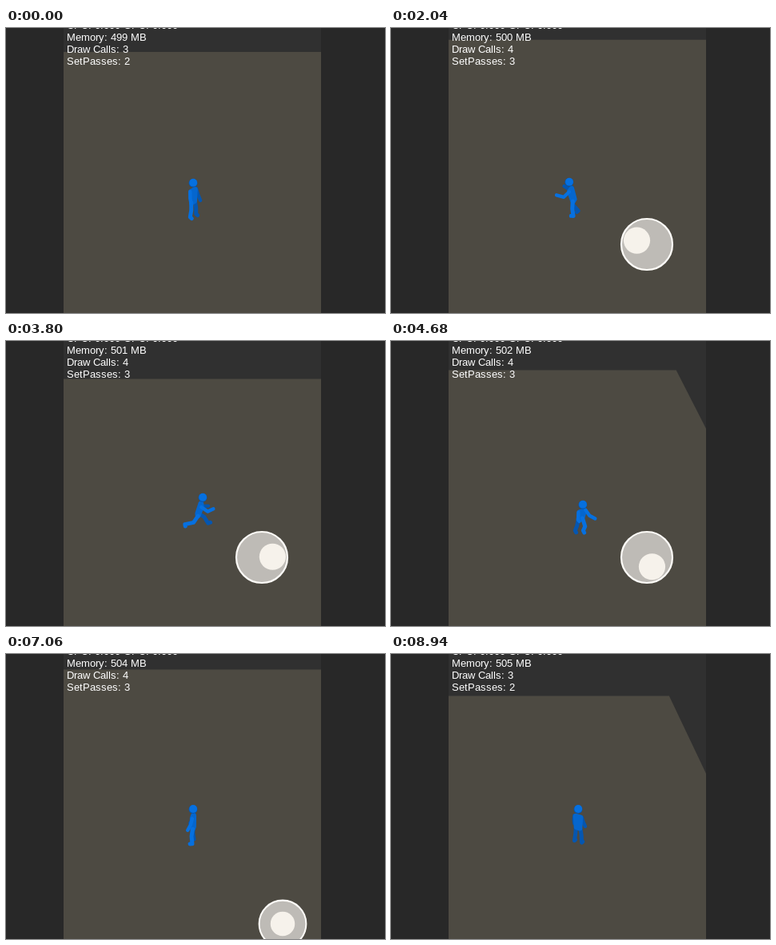
An HTML page with a canvas for the animation above (8.96 s loop, 474 by 357 pixels).

```html
<!DOCTYPE html>
<html lang="en">
<head>
<meta charset="utf-8">
<title>Joystick runner</title>
<style>
html, body { margin: 0; width: 100%; height: 100%; overflow: hidden; background: #282828; }
canvas { display: block; }
</style>
</head>
<body>
<canvas id="stage" width="474" height="357"></canvas>
<script>
const ctx = document.getElementById('stage').getContext('2d');
const LOOP = 8960, TAU = Math.PI * 2;
const { sin, cos } = Math;

// Two presses of the stick: it pops up, is pushed from `move` on, and let go at `up`.
const touches = [
  { x: 320, y: 271, down: 720, move: 1100, up: 5638 },
  { x: 346, y: 338, down: 6960, move: 7150, up: 8488 }
];
// Direction of travel in degrees, clockwise from screen right: [time, angle].
const turns = [[1100, 48], [2030, 200], [2980, 297], [4680, 421], [5650, 550], [7060, 550], [7120, 654]];

const ramp = (t, a, b) => Math.min(1, Math.max(0, (t - a) / (b - a)));
const ease = u => u * u * (3 - 2 * u);
const touchAt = t => touches[t < 6400 ? 0 : 1];

function headingAt(t) {
  let deg = turns[0][1];
  for (let i = 1; i < turns.length; i++)
    deg += (turns[i][1] - turns[i - 1][1]) * ramp(t, turns[i - 1][0], turns[i][0]);
  return deg * Math.PI / 180;
}

function runAt(t) {
  const { move, up } = touchAt(t);
  return ease(ramp(t, move - 100, move + 200)) * (1 - ease(ramp(t, up, up + 250)));
}

// The camera follows the runner, so the far floor corner moves against the travel.
function floorCorner(t) {
  let x = 416, y = 30;
  for (let s = 5; s < t; s += 10) {
    const { move, up } = touchAt(s);
    if (s < move || s > up) continue;
    const a = headingAt(s);
    x -= .85 * cos(a);
    y -= .27 * sin(a);
  }
  return [x, y];
}

function disc(x, y, r, fill) {
  ctx.beginPath();
  ctx.arc(x, y, r, 0, TAU);
  ctx.fillStyle = fill;
  ctx.fill();
}

function path(points, width, color) {
  ctx.beginPath();
  points.forEach(p => ctx.lineTo(...p));
  ctx.lineWidth = width;
  ctx.strokeStyle = color;
  ctx.stroke();
}

function drawFloor(t) {
  const [x, y] = floorCorner(t);
  ctx.fillStyle = '#282828';
  ctx.fillRect(0, 0, 474, 357);
  ctx.fillStyle = '#303030';
  ctx.fillRect(72, 0, 322, 357);
  ctx.save();
  ctx.beginPath();
  ctx.rect(72, 0, 322, 357);
  ctx.clip();
  ctx.beginPath();
  ctx.moveTo(72, y);
  ctx.lineTo(x, y);
  ctx.lineTo(x + (357 - y) * (x - 235) * .0042, 357);
  ctx.lineTo(72, 357);
  ctx.fillStyle = '#4d4a42';
  ctx.fill();
  ctx.restore();
}

// A jointed body in (right, up, forward) space, seen from above at a slant.
function drawRunner(t) {
  const run = runAt(t), a = headingAt(t);
  const phase = TAU * 2.1 * (t - 2980) / 1000;
  const rootX = 234 + 6 * run * cos(a), rootY = 235 + run * (6 * sin(a) - 3);
  const project = ([r, u, f]) => [
    rootX + f * cos(a) - r * sin(a),
    rootY + .6 * (f * sin(a) + r * cos(a)) - .8 * u
  ];
  const bone = ([r, u, f], length, angle, out) => [r + out, u - length * cos(angle), f + length * sin(angle)];

  const hip = 22 - 4 * run, chest = hip + 18 - 3 * run + .4 * sin(t / 300), lean = 4 * run;
  const dark = '#0556b0', mid = '#0566ce', light = '#0670e0';
  const parts = [];
  const addPart = (points, width) => {
    const [r, , f] = points[points.length - 1];
    const depth = f * sin(a) + r * cos(a);
    parts.push({ depth, points, width, color: depth < 0 ? dark : light });
  };

  for (const side of [-1, 1]) {
    const swing = run * sin(phase + side * Math.PI / 2 - Math.PI / 2);
    const lift = run * cos(phase + side * Math.PI / 2 - Math.PI / 2);

    const thigh = .1 + .7 * swing + .05 * run;
    const shin = thigh - .2 - .4 * run - .5 * lift + .3 * swing;
    const socket = [side * 3, hip, 0];
    const knee = bone(socket, 11, thigh, side);
    const ankle = bone(knee, 11, shin, side * (1 - run));
    addPart([socket, knee, ankle, bone(ankle, 3, shin + 1.5, 0)], 5);

    const upper = .2 + .4 * run - .5 * swing;
    const shoulder = [side * 5, chest, lean];
    const elbow = bone(shoulder, 9, upper, side * (1.5 + 2.5 * run));
    const hand = bone(elbow, 9, upper + .2 + run, side * (1 + 2 * run));
    addPart([shoulder, elbow, hand], 4.4);
  }
  const torso = [[-3, chest - 1, lean], [3, chest - 1, lean], [2, hip, 0], [-2, hip, 0], [-3, chest - 1, lean]];
  parts.push({ depth: 0, points: torso, width: 7, color: mid });

  ctx.lineCap = ctx.lineJoin = 'round';
  parts.sort((p, q) => p.depth - q.depth)
    .forEach(p => path(p.points.map(project), p.width, p.color));
  const [x, y] = project([0, chest + 11, lean + 2 * run]);
  disc(x, y, 5.4, dark);
  disc(x + .2, y - .5, 4.9, light);
}

function drawStick(t) {
  const { x, y, down, move, up } = touchAt(t);
  const scale = ramp(t, down, down + 110) * (1 - ramp(t, up, up + 140));
  if (!scale) return false;
  const reach = 13.4 * ramp(t, move - 70, move) * (1 - ramp(t, up, up + 20));
  const a = headingAt(t);
  ctx.save();
  ctx.translate(x, y);
  ctx.scale(scale, scale);
  disc(0, 0, 32, '#bebbb6');
  ctx.lineWidth = 2.2;
  ctx.strokeStyle = '#fdfbf7';
  ctx.stroke();
  disc(cos(a) * reach, sin(a) * reach, 16.6, '#f6f2eb');
  ctx.restore();
  return true;
}

// Letters advance by whole pixels.
function drawLine(text, x, y) {
  for (const letter of text) {
    ctx.fillText(letter, x, y);
    x += Math.round(ctx.measureText(letter).width + .01);
  }
}

function drawStats(t, active) {
  ctx.font = '13px "Liberation Sans", Arial, sans-serif';
  ctx.fillStyle = '#fff';
  [
    'CPU: 0.000 GPU: 0.000',
    `Memory: ${Math.floor(499 + t / 1400)} MB`,
    `Draw Calls: ${active ? 4 : 3}`,
    `SetPasses: ${active ? 3 : 2}`
  ].forEach((line, i) => drawLine(line, 76, 1 + i * 15));
}

function frame() {
  const t = performance.now() % LOOP;
  drawFloor(t);
  drawRunner(t);
  drawStats(t, drawStick(t));
  requestAnimationFrame(frame);
}
frame();
</script>
</body>
</html>
```
